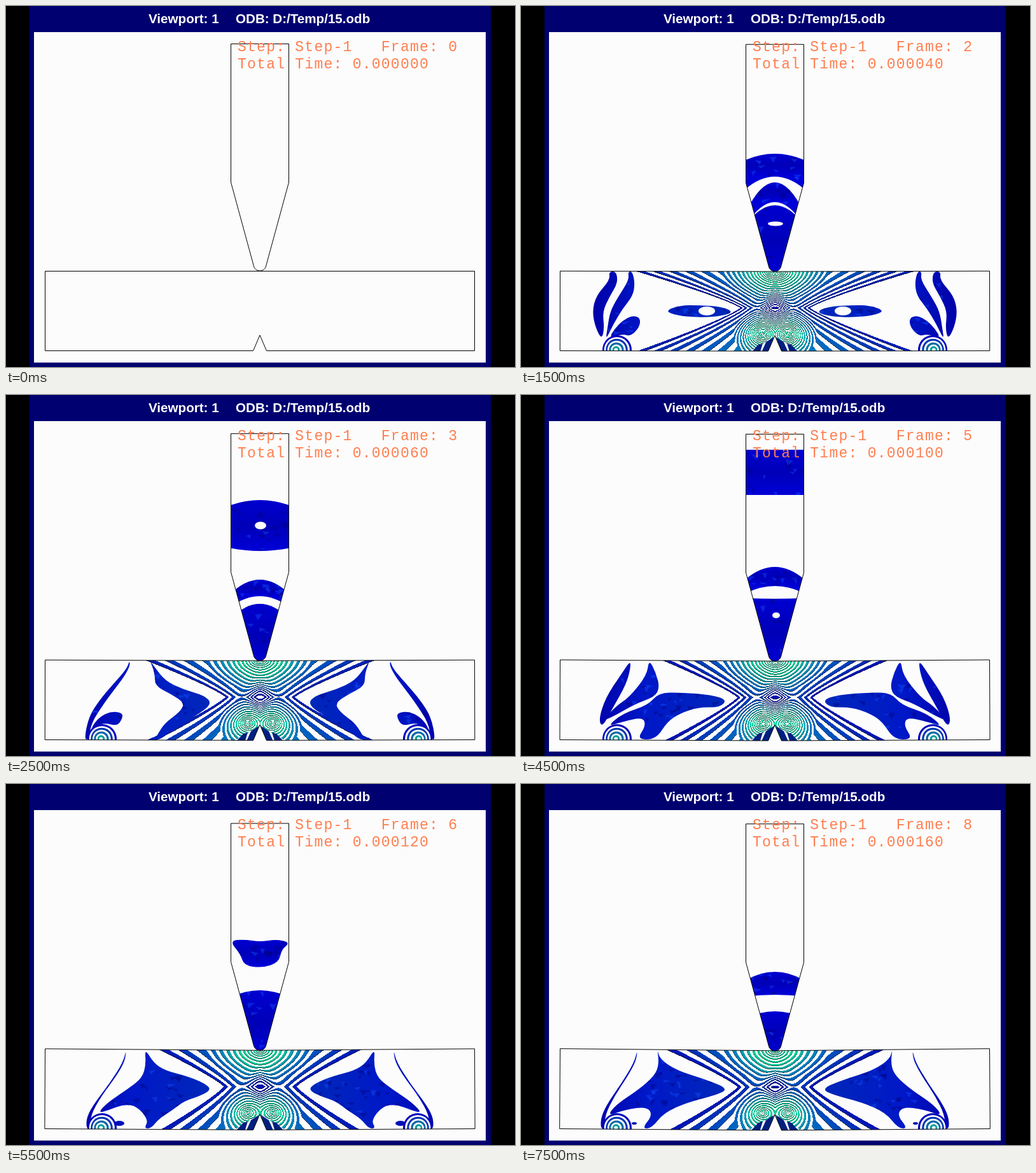
An HTML page with a canvas for the animation above (8 s loop, 800 by 567 pixels).

```html
<!DOCTYPE html>
<html lang="en">
<head>
<meta charset="utf-8">
<title>Impact stress contours</title>
<style>
html, body { margin: 0; width: 100%; height: 100%; overflow: hidden; background: #000; }
#stage { position: absolute; left: 0; top: 0; width: 800px; height: 567px; overflow: hidden; }
canvas { position: absolute; left: 0; top: 0; }
p { position: absolute; margin: 0; white-space: pre; line-height: 28px; }
.head { top: 6px; color: #fff; font: bold 20.6px/28px "Liberation Sans", Arial, sans-serif; }
.info { left: 364px; color: #ff7f50; font: 23px/28px "Courier New", "Liberation Mono", monospace; letter-spacing: 1.25px; }
</style>
</head>
<body>
<div id="stage">
<canvas id="view" width="800" height="567"></canvas>
<p class="head" style="left:224px">Viewport: 1</p>
<p class="head" style="left:361px">ODB: D:/Temp/15.odb</p>
<p class="info" id="step" style="top:51px"></p>
<p class="info" id="time" style="top:78px"></p>
</div>
<script>
const ctx = document.getElementById('view').getContext('2d');
const stepText = document.getElementById('step');
const timeText = document.getElementById('time');
const CX = 399, TIP = 430, WHITE = '#fcfcfc', BLUE = '#0000d0';

// Left half of the beam; every outline is mirrored about CX.
const early = [
  [138,417, 140,430, 118,455, 112,480, 117,505, 127,524, 131,505, 128,480, 140,455, 152,435, 150,417],
  [168,417, 170,430, 152,458, 140,480, 136,505, 133,525, 145,500, 160,475, 176,455, 179,435, 175,417],
  [188,490, 175,486, 160,494, 148,506, 138,522, 160,515, 172,519, 186,505],
  [226,479, 250,470, 280,470, 315,472, 335,481, 310,488, 275,489, 245,486]
];
const middle = [
  [194,417, 190,430, 165,458, 148,478, 130,505, 123,541, 130,541, 134,515, 155,483, 170,463, 186,442, 195,425],
  [226,417, 234,437, 234,457, 260,470, 281,484, 273,498, 250,515, 240,530, 234,541, 243,541, 262,525, 300,503, 324,485, 312,472, 280,463, 250,449, 232,425],
  [183,499, 165,497, 148,505, 135,520, 131,538, 142,520, 155,515, 175,520, 183,508]
];
const rough = [
  [172,417, 158,438, 133,475, 122,510, 128,522, 145,490, 165,455, 172,430],
  [201,415, 198,440, 170,475, 150,488, 128,512, 145,505, 180,485, 210,474, 218,460, 212,436],
  [216,468, 250,467, 300,471, 324,479, 312,491, 280,490, 250,500, 230,513, 212,541, 182,541, 196,520, 192,506, 160,513, 135,521, 160,500, 200,487]
];
const late = [
  [189,417, 184,437, 163,470, 140,500, 127,522, 126,541, 133,541, 133,520, 150,490, 174,458, 187,435],
  [218,415, 232,438, 250,450, 285,459, 312,470, 323,480, 305,490, 280,498, 262,512, 240,526, 228,541, 217,541, 224,528, 206,506, 185,503, 162,512, 144,517, 160,500, 190,480, 214,462, 220,440]
];
const settled = [
  [183,417, 178,437, 158,470, 137,500, 126,522, 125,541, 132,541, 132,520, 147,490, 167,460, 181,435],
  [214,415, 218,432, 245,450, 290,464, 327,479, 305,489, 262,500, 225,516, 205,541, 190,541, 207,520, 198,507, 165,511, 135,522, 150,503, 185,480, 210,458, 217,440]
];

// field: [fan width, band spacing, outermost band]; bands: [top mid, top edge, bottom mid, bottom edge]
const states = [
  {},
  { field: [1, 9, 27], rings: .35, side: [], bands: [[315, 345, TIP, TIP]], holes: [[400, 372, 8, 3]] },
  { field: [2.6, 7, 53], rings: 1, side: early,
    bands: [[232, 243, 268, 290], [277, 331, 308, 350], [313, 348, TIP, TIP]],
    holes: [[400, 342, 12, 3.5]], beamHoles: [[292, 479, 13, 7]] },
  { field: [1.9, 10, 52], rings: 1, side: middle,
    bands: [[165, 174, 245, 240], [290, 315, 316, 335], [328, 355, TIP, TIP]], holes: [[400, 205, 9, 6]] },
  { field: [1.4, 12, 49], rings: 1, side: middle, eye: 14,
    bands: [[100, 108, 118, 112], [181, 182, 293, 266], [336, 366, TIP, TIP]],
    holes: [[400, 194, 16, 15], [406, 184, 9, 8], [401, 243, 8, 6]] },
  { field: [1.6, 9, 57], rings: 1, side: rough,
    bands: [[86, 86, 157, 157], [270, 292, 300, 313], [320, 319, TIP, TIP]], holes: [[401, 346, 6, 4.5]] },
  { field: [1.4, 12, 54], rings: 1, side: late, eye: 8,
    bowl: [351,246, 375,244, 399,248, 425,244, 447,249, 433,260, 429,280, 403,289, 374,285, 369,268],
    bands: [[324, 336, TIP, TIP]] },
  { field: [1.5, 12, 55], rings: 1, side: late, eye: 6,
    bands: [[268, 280, 308, 310], [342, 354, TIP, TIP]] },
  { field: [1.5, 12, 56], rings: 1, side: settled, eye: 4,
    bands: [[295, 310, 331, 334], [357, 369, TIP, TIP]] }
];

function rng(seed) {
  return () => (seed = (seed * 16807) % 2147483647) / 2147483647;
}

function smooth(pts) {
  const p = new Path2D(), n = pts.length;
  const mid = i => [(pts[i % n] + pts[(i + 2) % n]) / 2, (pts[(i + 1) % n] + pts[(i + 3) % n]) / 2];
  p.moveTo(...mid(0));
  for (let i = 2; i <= n; i += 2) p.quadraticCurveTo(pts[i % n], pts[(i + 1) % n], ...mid(i));
  p.closePath();
  return p;
}

function ellipse(x, y, rx, ry, color) {
  ctx.fillStyle = color;
  ctx.beginPath();
  ctx.ellipse(x, y, rx, ry, 0, 0, 7);
  ctx.fill();
}

// Flat facets that give a filled area its uneven shading.
function facets(path, x, y, w, h, count, rand) {
  ctx.save();
  ctx.clip(path);
  for (let i = 0; i < count; i++) {
    const px = x + rand() * w, py = y + rand() * h;
    ctx.fillStyle = rand() < .6 ? 'rgba(0,0,120,.4)' : 'rgba(20,80,255,.4)';
    ctx.beginPath();
    ctx.moveTo(px, py);
    ctx.lineTo(px + 4 + rand() * 10, py + rand() * 5 - 2);
    ctx.lineTo(px + rand() * 8, py + 3 + rand() * 7);
    ctx.fill();
  }
  ctx.restore();
}

function punchPath(dy) {
  const p = new Path2D();
  p.moveTo(353.5, 59.5 + dy);
  p.lineTo(444.5, 59.5 + dy);
  p.lineTo(444.5, 277 + dy);
  p.lineTo(409, 407 + dy);
  p.bezierCurveTo(407, 419 + dy, 391, 419 + dy, 389, 407 + dy);
  p.lineTo(353.5, 277 + dy);
  p.closePath();
  return p;
}

function beamPath(n) {
  const sag = n * .3, rise = n * .1, p = new Path2D();
  p.moveTo(61.5, 416.5 - rise);
  p.lineTo(CX, 416.5 + sag);
  p.lineTo(736.5, 416.5 - rise);
  p.lineTo(736.5 + rise, 541.5);
  p.lineTo(409.5, 541.5 + sag);
  p.lineTo(CX, 517 + sag);
  p.lineTo(388.5, 541.5 + sag);
  p.lineTo(61.5 - rise, 541.5);
  p.closePath();
  return p;
}

// Stress level: bending fan, low spot at mid height, peaks under the tip and beside the notch.
function stress(u, v, fan) {
  const dv = v - 57, y = Math.abs(dv) / (dv < 0 ? 57 : 68);
  const s = (u - 20 * y) / (1 + fan * Math.pow(y, 1.2));
  const low = 66 * Math.exp(-Math.pow((u + Math.abs(dv) * .35) / 20, 2) - Math.pow((Math.abs(dv) + u * .35) / 23, 2));
  const top = 40 * Math.max(0, Math.log(48 / (Math.hypot(u / 1.8, v) + 2)));
  const notch = 45 * Math.max(0, Math.log(38 / (Math.hypot((u - 20) / 1.25, v - 98) + 1.5)));
  return { s, f: top + notch - s - low };
}

function tint(q) {
  q = Math.max(0, Math.min(1, q));
  const a = Math.min(1, q * 2), b = Math.max(0, q * 2 - 1);
  return [0, 20 + 95 * a + 95 * b, 180 + 15 * a - 40 * b];
}

const layer = document.createElement('canvas');
const R = 240, H = 132;
layer.width = 2 * R;
layer.height = H;
const layerCtx = layer.getContext('2d');

function drawField([fan, gap, outer], sag) {
  const img = layerCtx.createImageData(2 * R, H);
  const isBand = f => {
    const t = (f + outer) / gap;
    return Math.abs(t - Math.round(t)) < .26;
  };
  for (let v = 0; v < H; v++) {
    for (let u = 0; u < R; u++) {
      const { s, f } = stress(u, v - sag, fan);
      if (s > outer + gap * .4 || !isBand(f)) continue;
      const shade = isBand(stress(u, v + 1 - sag, fan).f) ? 1 : .45;
      const c = tint((f + 58) / 88);
      for (const x of [R + u, R - u]) {
        const i = 4 * (v * 2 * R + x);
        for (let k = 0; k < 3; k++) img.data[i + k] = c[k] * shade;
        img.data[i + 3] = 255;
      }
    }
  }
  layerCtx.putImageData(img, 0, 0);
  ctx.drawImage(layer, CX - R, 416);
}

function drawSide(st, n) {
  const rand = rng(71 + n);
  for (const pts of st.side) {
    const path = smooth(pts);
    const fill = ctx.createLinearGradient(110, 0, 330, 0);
    fill.addColorStop(0, '#0000a8');
    fill.addColorStop(.4, '#0018c8');
    fill.addColorStop(1, '#0028b8');
    ctx.fillStyle = fill;
    ctx.fill(path);
    facets(path, 130, 430, 200, 90, 70, rand);
  }
  for (const h of st.beamHoles || []) ellipse(...h, WHITE);
  if (st.eye) {
    ellipse(178, 533, st.eye, st.eye / 2, '#0010b8');
    if (st.eye > 10) ellipse(179, 534, 7, 3, WHITE);
  }
  for (let i = 0; i < 8; i++) {
    const r = st.rings * (1 - i / 8);
    ellipse(149 + 2 * r, 540, 23 * r, 23 * r, i % 2 ? WHITE : `rgb(0,${i * 26},${190 - i * 6})`);
  }
  // Unloaded corner beside the notch.
  ctx.fillStyle = WHITE;
  ctx.fill(new Path2D('M354 546L396 521L399 546Z'));
  ctx.fillStyle = '#002080';
  ctx.fill(new Path2D('M360 546L373 532L380 530L375 546ZM377 546L385 528L397 520L392 546Z'));
}

function drawBeam(st, n) {
  const path = beamPath(n);
  ctx.save();
  ctx.clip(path);
  if (st.field) {
    drawField(st.field, n * .3);
    drawSide(st, n);
    ctx.translate(2 * CX, 0);
    ctx.scale(-1, 1);
    drawSide(st, n + 20);
  }
  ctx.restore();
  ctx.stroke(path);
}

function drawPunch(st, n) {
  const path = punchPath(n * .4), rand = rng(500 + n);
  ctx.save();
  ctx.clip(path);
  const shapes = (st.bands || []).map(([tm, te, bm, be]) => {
    const p = new Path2D();
    p.moveTo(350, te);
    p.quadraticCurveTo(CX, 2 * tm - te, 448, te);
    p.lineTo(448, be);
    p.quadraticCurveTo(CX, 2 * bm - be, 350, be);
    return [p, tm, bm];
  });
  if (st.bowl) shapes.push([smooth(st.bowl), 245, 287]);
  for (const [p, y0, y1] of shapes) {
    const fill = ctx.createLinearGradient(0, y0, 0, y1);
    fill.addColorStop(0, BLUE);
    fill.addColorStop(.5, '#0000b8');
    fill.addColorStop(1, '#0000d8');
    ctx.fillStyle = fill;
    ctx.fill(p);
    facets(p, 355, y0, 88, y1 - y0, 18, rand);
  }
  for (const h of st.holes || []) ellipse(...h, WHITE);
  ctx.restore();
  ctx.stroke(path);
}

function draw(n) {
  const rect = (color, x, y, w, h) => {
    ctx.fillStyle = color;
    ctx.fillRect(x, y, w, h);
  };
  rect('#000', 0, 0, 800, 567);
  rect('#000070', 37, 0, 725, 567);
  rect(WHITE, 44, 41, 710, 519);
  ctx.strokeStyle = '#000';
  ctx.lineWidth = 1;
  drawBeam(states[n], n);
  drawPunch(states[n], n);
  stepText.textContent = `Step: Step-1   Frame: ${n}`;
  timeText.textContent = `Total Time: ${(n * 2e-5).toFixed(6)}`;
}

let shown = -1;
function tick() {
  const n = Math.floor((performance.now() % 8000 + 500) / 1000);
  if (n !== shown) draw(shown = n);
  requestAnimationFrame(tick);
}
tick();
</script>
</body>
</html>
```
